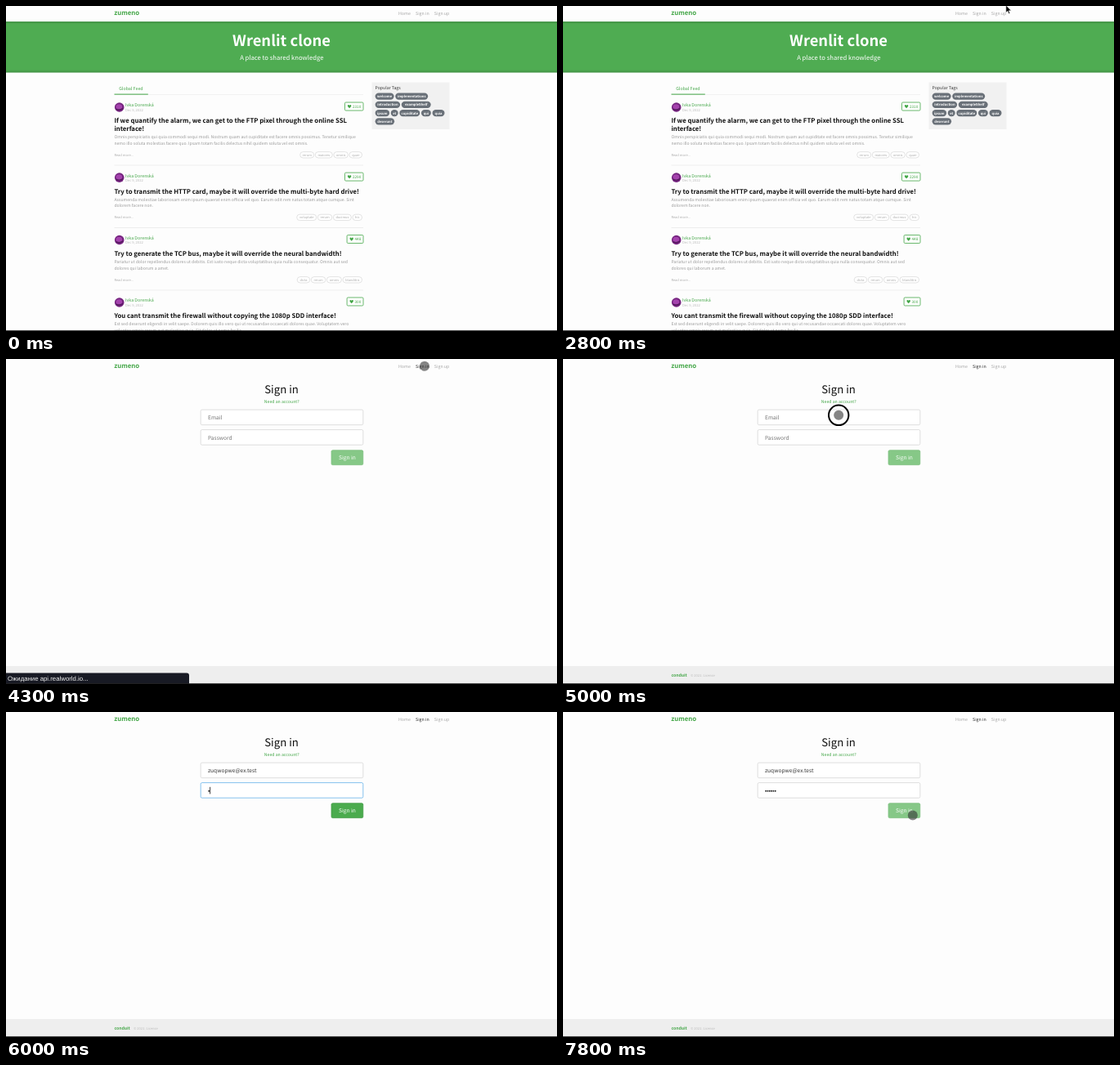
Recreate the animation shown at these times as an HTML page. Size 674 by 398 pixels, loop 8 s.

```html
<!DOCTYPE html>
<html lang="en">
<head>
<meta charset="utf-8">
<title>Blog sign in</title>
<style>
  html, body { margin: 0; width: 100%; height: 100%; overflow: hidden; background: #fdfdfd; }
  svg { display: block; width: 674px; height: 398px; }
  text {
    font-family: "Noto Sans CJK JP", "Noto Sans CJK SC", "Noto Sans CJK KR", "Noto Sans", sans-serif;
    text-rendering: geometricPrecision;
    white-space: pre;
  }
</style>
</head>
<body>
<svg id="stage" viewBox="0 0 674 398" xmlns="http://www.w3.org/2000/svg"></svg>
<script>
const GREEN = '#43a647';
const LOOP = 8000, STEP = 100;
const EMAIL = 'zuqwopwe@ex.test';
const AUTHOR = 'Ivka Dorenská';

const rect = (x, y, w, h, fill, extra = '') =>
  `<rect x="${x}" y="${y}" width="${w}" height="${h}" fill="${fill}" ${extra}/>`;
const text = (x, y, size, fill, content, extra = '') =>
  `<text x="${x}" y="${y}" font-size="${size}" fill="${fill}" ${extra}>${content}</text>`;
const MIDDLE = 'text-anchor="middle"';
const BOLD = 'font-weight="600"';

// Lays pills out from the left; items are [label, width].
function pills(x, cy, items, gap, height, style, textSize, textFill, extra = '') {
  return items.map(([label, width]) => {
    const pill = rect(x, cy - height / 2, width, height, style.fill,
      `rx="${height / 2}" stroke="${style.stroke}" stroke-width=".6"`) +
      text(x + width / 2, cy + textSize * .36, textSize, textFill, label, MIDDLE + ' ' + extra);
    x += width + gap;
    return pill;
  }).join('');
}

const articles = [
  { cy: 124, likes: 2310,
    title: ['If we quantify the alarm, we can get to the FTP pixel through the online SSL', 'interface!'],
    body: ['Omnis perspiciatis qui quia commodi sequi modi. Nostrum quam aut cupiditate est facere omnis possimus. Tenetur similique',
      'nemo illo soluta molestias facere quo. Ipsam totam facilis delectus nihil quidem soluta vel est omnis.'],
    tags: [['rerum', 17], ['maiores', 21], ['omnis', 17.5], ['quae', 15.5]] },
  { cy: 210.1, likes: 2290,
    title: ['Try to transmit the HTTP card, maybe it will override the multi-byte hard drive!'],
    body: ['Assumenda molestiae laboriosam enim ipsum quaerat enim officia vel quo. Earum odit rem natus totam atque cumque. Sint',
      'dolorem facere non.'],
    tags: [['voluptate', 24], ['rerum', 17.5], ['ducimus', 22], ['hic', 11.5]] },
  { cy: 286.5, likes: 448,
    title: ['Try to generate the TCP bus, maybe it will override the neural bandwidth!'],
    body: ['Pariatur ut dolor repellendus dolores ut debitis. Est iusto neque dicta voluptatibus quia nulla consequatur. Omnis aut sed',
      'dolores qui laborum a amet.'],
    tags: [['dicta', 15.5], ['rerum', 17.5], ['omnis', 18], ['blanditiis', 23.5]] },
  { cy: 363, likes: 300,
    title: ['You cant transmit the firewall without copying the 1080p SDD interface!'],
    body: ['Est sed deserunt eligendi in velit saepe. Dolorem quis illo vero qui ut recusandae occaecati dolores quae. Voluptatem vero',
      'voluptas omnis rerum aut molestiae quia. Sit dolor ut nemo facilis.'],
    tags: [] }
];

function likeButton(cy, count) {
  const width = String(count).length * 2.6 + 12.1;
  const left = 437 - width;
  return rect(left, cy - 6, width, 10, '#fff', `rx="1.2" stroke="${GREEN}" stroke-width=".8"`) +
    `<path transform="translate(${left + 5.6} ${cy - 1})" fill="${GREEN}"
      d="M0 2.2C-1.4 1-2.2.2-2.2-.7C-2.2-2.2-.5-2.4 0-1.1C.5-2.4 2.2-2.2 2.2-.7C2.2.2 1.4 1 0 2.2Z"/>` +
    text(left + 9.4, cy + .8, 4.7, GREEN, count);
}

function article({ cy, likes, title, body, tags }) {
  const last = cy + 19.4 + (title.length - 1) * 9.5;
  const gap = 1.6;
  const tagsWidth = tags.reduce((sum, [, w]) => sum + w + gap, -gap);
  return `<g transform="translate(138.7 ${cy})">
      <circle r="5.8" fill="#75247f"/>
      <ellipse cx="-.4" cy="-.6" rx="3.8" ry="3.2" fill="#a443ad"/>
      <path d="M-4 2Q0 4.5 4 1.6" fill="none" stroke="#4f1859" stroke-width="1.2"/>
    </g>` +
    text(146, cy - .6, 5.3, GREEN, AUTHOR) +
    text(146, cy + 4.6, 4.15, '#b9b9b9', 'Dec 9, 2022') +
    likeButton(cy, likes) +
    title.map((line, i) => text(132.4, cy + 19.4 + i * 9.5, 7.74, '#111', line, BOLD)).join('') +
    body.map((line, i) => text(132.4, last + 9 + i * 7.7, 5.1, '#9a9a9a', line)).join('') +
    text(132.4, last + 30.9, 4.05, '#adadad', 'Read more...') +
    pills(435.5 - tagsWidth, last + 29.4, tags, gap, 7.4,
      { fill: '#fff', stroke: '#d0d0d0' }, 3.95, '#a9a9a9') +
    rect(132.5, last + 41.8, 304.5, .6, '#e3e3e3');
}

function sidebar() {
  const rows = [
    [['welcome', 23], ['implementations', 40]],
    [['introduction', 30.5], ['exampleShelf', 36]],
    [['ipsum', 17.5], ['et', 9], ['cupiditate', 25], ['qui', 12], ['quia', 15]],
    [['deserunt', 23.5]]
  ];
  const dark = { fill: '#697078', stroke: 'none' };
  return rect(447.5, 93.5, 95, 57.5, '#f1f1f1') +
    text(451.5, 102, 5.2, '#333', 'Popular Tags') +
    rows.map((row, i) => pills(451.6, 110.6 + i * 10.25, row, 1.6, 8.4, dark, 4.1, '#fff', BOLD)).join('');
}

const feedPage = () =>
  rect(0, 19, 674, 62.5, '#4fac52') +
  rect(0, 19, 674, 3.5, 'url(#shadeTop)') + rect(0, 78, 674, 3.5, 'url(#shadeBottom)') +
  text(337, 49, 18.4, '#fff', 'Wrenlit clone', MIDDLE + ' font-weight="700"') +
  text(337.3, 66, 7.7, '#fff', 'A place to shared knowledge', MIDDLE) +
  text(138.2, 103, 5.35, GREEN, 'Global Feed') +
  rect(132.5, 108, 304.5, .5, '#e6e6e6') + rect(132.5, 107.6, 41.3, 1, GREEN) +
  articles.map(article).join('') + sidebar();

const field = (id, y, placeholder) =>
  rect(238.2, y, 198.6, 18.6, '#fff', `id="${id}" rx="1.6" stroke-width=".8"`) +
  text(247, y + 12, 6.6, '#737373', placeholder, `id="${id}Hint"`);

const signInPage = () =>
  text(337, 41.6, 13.2, '#111', 'Sign in', MIDDLE) +
  text(337.2, 54, 5.2, GREEN, 'Need an account?', MIDDLE) +
  field('email', 62.1, 'Email') + field('password', 86.6, 'Password') +
  text(247, 74.1, 6.6, '#333', '', 'id="emailValue"') +
  '<g id="dots"></g>' + rect(0, 0, .8, 8.6, '#111', 'id="caret"') +
  rect(398, 111.7, 38.8, 18, GREEN, 'id="button" rx="1.6" stroke-width=".7"') +
  text(417.4, 123.2, 6.6, '#fff', 'Sign in', MIDDLE + ' font-weight="500"') +
  rect(0, 376, 674, 22, '#eeeeee') +
  text(132.4, 389.2, 5.15, GREEN, 'conduit', BOLD) +
  text(156, 388.8, 4.1, '#bcbcbc', '© 2022. License') +
  `<g id="status"><path d="M0 384.5H221Q224 384.5 224 387.5V398H0Z" fill="#181a24"/>
    <text x="2" y="394" font-size="7.8" fill="#f2f2f2"
      style="font-family:'Liberation Sans',Arial,sans-serif">Ожидание api.realworld.io...</text></g>`;

const shade = (id, from, to) =>
  `<linearGradient id="${id}" x2="0" y2="1">
    <stop stop-opacity="${from}"/><stop offset="1" stop-opacity="${to}"/></linearGradient>`;

const stage = document.getElementById('stage');
stage.innerHTML =
  `<defs>${shade('shadeTop', .16, 0)}${shade('shadeBottom', 0, .16)}</defs>` +
  rect(0, 0, 674, 398, '#fdfdfd') +
  text(132.3, 11, 7.8, GREEN, 'zumeno', BOLD) +
  text(480, 10.6, 5.3, '#a6a6a6', 'Home') +
  text(501, 10.6, 5.3, '#a6a6a6', 'Sign in', 'id="navSignIn"') +
  text(523.8, 10.6, 5.3, '#a6a6a6', 'Sign up') +
  `<g id="feed">${feedPage()}</g><g id="signIn">${signInPage()}</g>` +
  rect(0, 397.2, 674, .8, '#222') +
  `<g id="cursor">
    <path id="arrow" d="M0 0V9.2L2.1 7.3L3.5 10.5L5 9.9L3.6 6.8H6.5Z" fill="#000" stroke="#fff" stroke-width=".6"/>
    <circle id="dot" r="6" fill="#333" fill-opacity=".6"/>
    <g id="ring" fill="none"><circle r="12.2" stroke="#fff" stroke-width="3.4"/>
      <circle r="12.2" stroke="#000" stroke-width="2"/></g>
  </g>`;

const $ = id => document.getElementById(id);
const show = (id, on) => $(id).setAttribute('display', on ? 'inline' : 'none');
const set = (id, attrs) => Object.entries(attrs).forEach(([k, v]) => $(id).setAttribute(k, v));
const between = (t, a, b) => t >= a && t < b;

// Pointer waypoints: [time, x, y].
const path = [
  [2500, 548, -6], [2800, 541.8, -1], [3000, 528, 6], [3100, 519.5, 8], [3200, 519.5, 8],
  [3400, 512, 8.7], [4500, 512, 8.7], [4700, 450, 31], [4900, 345, 66], [5000, 337.2, 68.8],
  [5600, 337.2, 68.8], [5700, 337.2, 96], [6800, 337.2, 96], [6900, 365, 106], [7100, 427.8, 126.6]
];

function pointerAt(t) {
  const next = path.findIndex(p => p[0] > t);
  if (next < 0) return path[path.length - 1].slice(1);
  if (next === 0) return path[0].slice(1);
  const [t0, x0, y0] = path[next - 1], [t1, x1, y1] = path[next];
  const k = (t - t0) / (t1 - t0);
  return [x0 + (x1 - x0) * k, y0 + (y1 - y0) * k];
}

function drawCursor(t) {
  const [x, y] = pointerAt(t);
  const arrow = between(t, 2500, 3000) || between(t, 4600, 5000) || between(t, 6900, 7100);
  const dot = between(t, 3000, 4600) || between(t, 5000, 5200) || between(t, 5700, 6000) || t >= 7100;
  const ring = between(t, 4000, 4200) || between(t, 5000, 5200) ||
    between(t, 5700, 5800) || between(t, 7300, 7500);
  set('cursor', { transform: `translate(${x} ${y})` });
  show('arrow', arrow);
  show('dot', dot);
  show('ring', ring);
}

function drawForm(t) {
  const typed = Math.round(16 * Math.min(1, Math.max(0, (t - 5100) / 500)));
  const dots = [6000, 6200, 6400, 6500, 6700, 6800].filter(time => t >= time).length;
  const onEmail = between(t, 5200, 5700), onPassword = between(t, 5700, 7500);
  const ready = between(t, 6000, 7500);
  const border = focused => ({ stroke: focused ? '#66b3ea' : '#d6d6d6' });

  $('emailValue').textContent = EMAIL.slice(0, typed);
  show('emailHint', !typed);
  show('passwordHint', !dots);
  set('email', border(onEmail));
  set('password', border(onPassword));
  $('dots').innerHTML = Array.from({ length: dots },
    (_, i) => `<circle cx="${248.2 + i * 2.3}" cy="96.7" r=".95" fill="#222"/>`).join('');

  show('caret', onEmail || onPassword);
  set('caret', onEmail
    ? { x: 247.3 + (typed ? $('emailValue').getComputedTextLength() : 0), y: 67.3 }
    : { x: 247 + dots * 2.3, y: 91.8 });
  set('button', { fill: ready ? '#4bab4e' : '#86c887', stroke: ready ? '#3f9a43' : '#7dbf7f' });
  show('status', t < 4800);
  set('status', { opacity: t < 4600 ? 1 : t < 4700 ? .65 : .3 });
}

function render(now) {
  const t = Math.floor((now % LOOP) / STEP) * STEP;
  const signingIn = t >= 4300;
  show('feed', !signingIn);
  show('signIn', signingIn);
  set('navSignIn', { fill: signingIn ? '#2b2b2b' : '#a6a6a6' });
  if (signingIn) drawForm(t);
  drawCursor(t);
}

function tick() {
  render(performance.now());
  requestAnimationFrame(tick);
}
tick();
</script>
</body>
</html>
```
